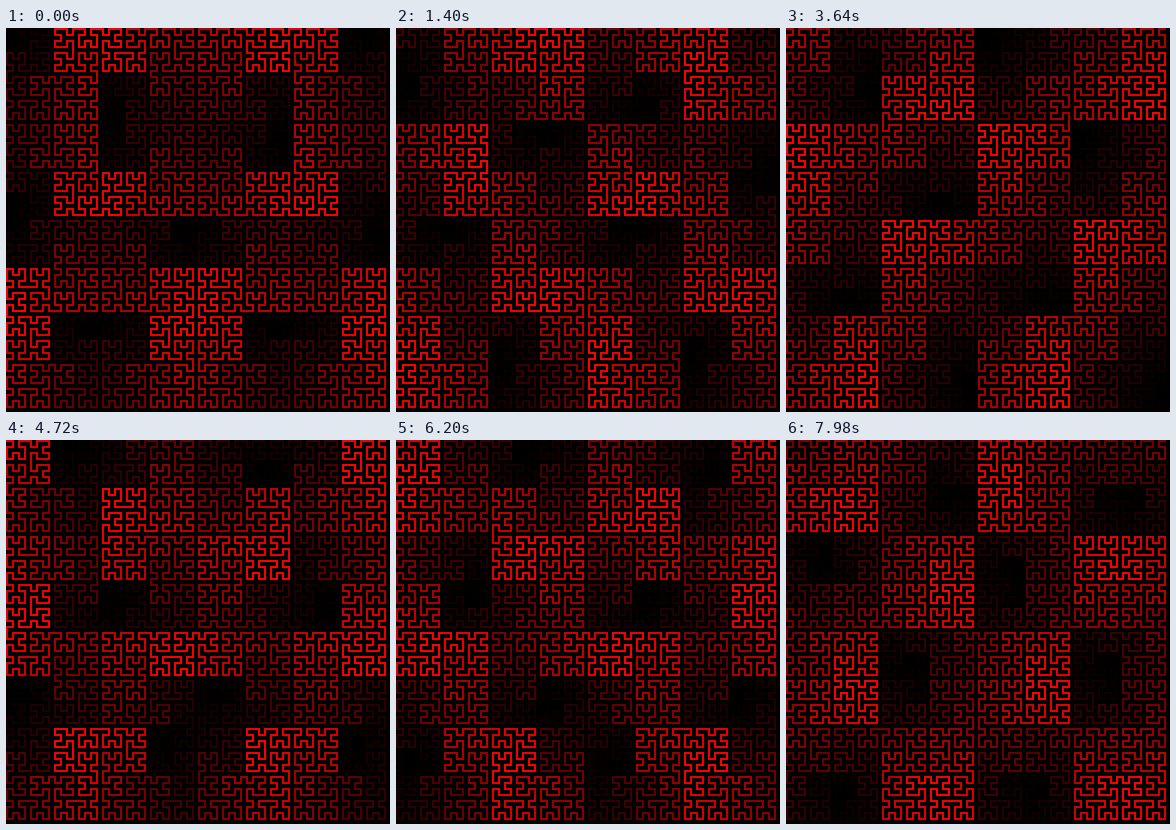
Write an HTML page with a canvas that moves like this. It is 384 px wide and 384 px high and loops after 8000 ms.

```html
<!DOCTYPE html>
<html lang="en">
<head>
<meta charset="utf-8">
<title>Hilbert curve wave</title>
<style>
  html, body { margin: 0; width: 100%; height: 100%; overflow: hidden; background: #000; }
  canvas { display: block; }
</style>
</head>
<body>
<canvas id="stage" width="384" height="384"></canvas>
<script>
const SIZE = 384, ORDER = 6, CELL = SIZE / 2 ** ORDER, LINE = 2;
const STEP_MS = 20, LOOP_MS = 8000, PEAK = 255, PERIOD = 2 * PEAK;

const ctx = document.getElementById('stage').getContext('2d');
const points = [];

// (ax, ay) and (bx, by) span the square; the curve runs along a, across b, back along a.
function hilbert(x, y, ax, ay, bx, by, depth) {
  if (depth === 0) {
    points.push([x + (ax + bx - CELL) / 2, y + (ay + by - CELL) / 2]);
    return;
  }
  ax /= 2; ay /= 2; bx /= 2; by /= 2;
  hilbert(x, y, bx, by, ax, ay, depth - 1);
  hilbert(x + ax, y + ay, ax, ay, bx, by, depth - 1);
  hilbert(x + ax + bx, y + ay + by, ax, ay, bx, by, depth - 1);
  hilbert(x + ax + 2 * bx, y + ay + 2 * by, -bx, -by, -ax, -ay, depth - 1);
}
hilbert(0, 0, 0, SIZE, SIZE, 0, ORDER);

const segments = points.slice(1).map(([x, y], i) => {
  const [px, py] = points[i];
  return [Math.min(x, px), Math.min(y, py), Math.abs(x - px) + LINE, Math.abs(y - py) + LINE];
});

const reds = Array.from({ length: PEAK + 1 }, (_, v) => `rgb(${v},0,0)`);

// Triangle wave: 0 up to PEAK and back down.
function level(n) {
  const phase = ((n % PERIOD) + PERIOD) % PERIOD;
  return PEAK - Math.abs(phase - PEAK);
}

function draw(shift) {
  ctx.fillStyle = '#000';
  ctx.fillRect(0, 0, SIZE, SIZE);
  segments.forEach((rect, i) => {
    ctx.fillStyle = reds[level(i - shift)];
    ctx.fillRect(...rect);
  });
}

const start = performance.now();
let shown = -1;
function tick() {
  const elapsed = Math.max(0, performance.now() - start) % LOOP_MS;
  const shift = Math.floor(elapsed / STEP_MS);
  if (shift !== shown) draw(shown = shift);
  requestAnimationFrame(tick);
}
tick();
</script>
</body>
</html>
```
